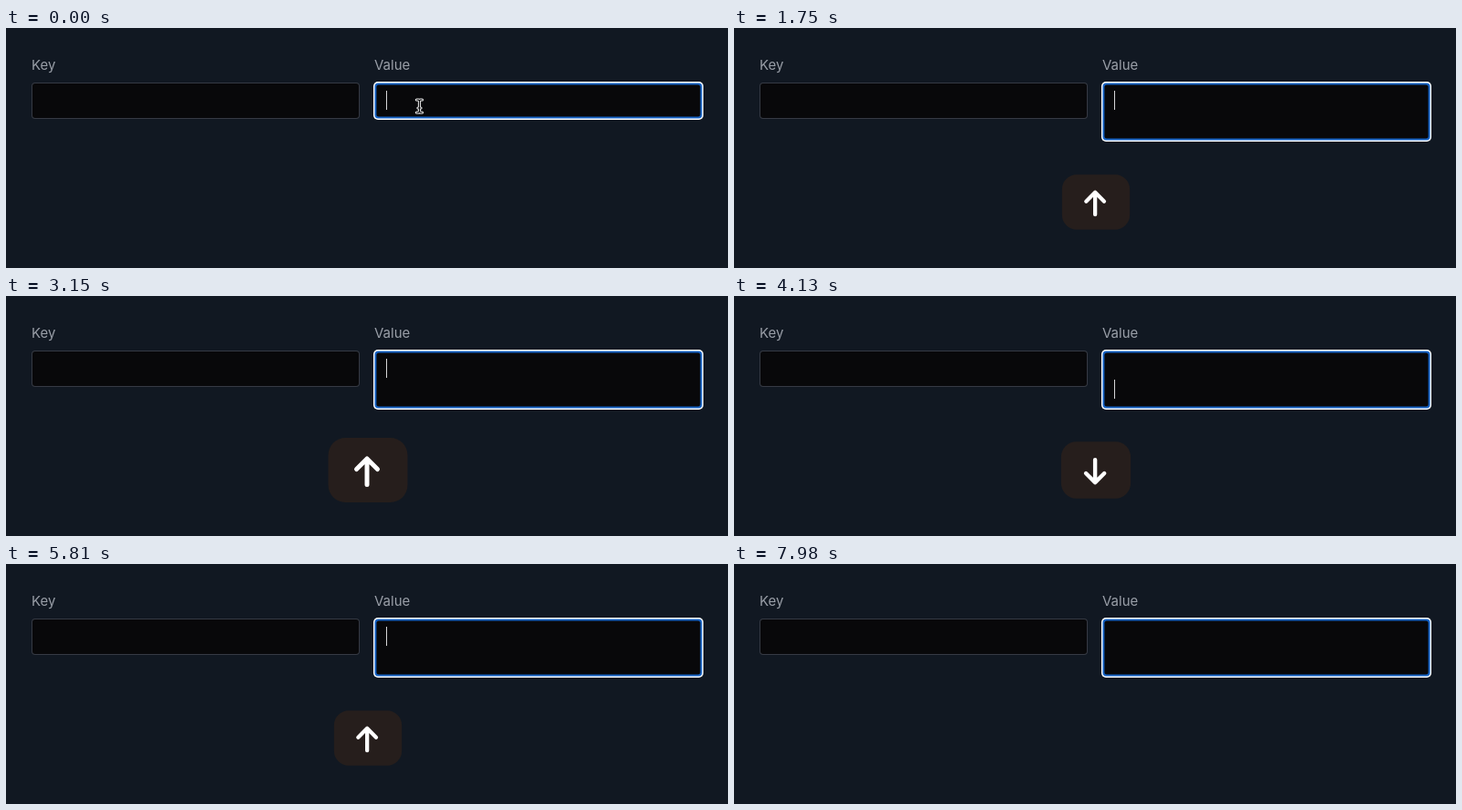
An HTML page with a canvas for the animation above (8120 ms loop, 792 by 264 pixels).

```html
<!DOCTYPE html>
<html lang="en">
<head>
<meta charset="utf-8">
<title>Key and value fields</title>
<style>
  html, body { margin: 0; width: 100%; height: 100%; overflow: hidden; background: #111822; }
  canvas { display: block; width: 792px; height: 264px; }
</style>
</head>
<body>
<canvas id="stage" width="792" height="264"></canvas>
<script>
const ctx = document.getElementById('stage').getContext('2d');
const LOOP = 8120, STEP = 70, BLINK = 500;
const POP = 280, FADE_AT = 840, FADE_END = 1180;
const LEAVE = 7070, LEAVE_TIME = 560;

const presses = [
  [980, 'enter'], [1750, 'up'], [2240, 'down'], [2660, 'up'],
  [4060, 'down'], [4690, 'up'], [5250, 'down'], [5810, 'up'], [6430, 'down']
].map(([at, key]) => ({ at, key }));

const clamp = v => Math.max(0, Math.min(1, v));
const smooth = p => p * p * (3 - 2 * p);

function box(x, y, w, h, r, color) {
  ctx.fillStyle = color;
  ctx.beginPath();
  ctx.roundRect(x, y, w, h, r);
  ctx.fill();
}

function lines(color, width, ...paths) {
  ctx.strokeStyle = color;
  ctx.lineWidth = width;
  ctx.beginPath();
  for (const path of paths) path.forEach(([x, y], i) => i ? ctx.lineTo(x, y) : ctx.moveTo(x, y));
  ctx.stroke();
}

function drawFields(tall) {
  const h = tall ? 66 : 42;
  ctx.font = '15px Inter, Roboto, sans-serif';
  ctx.fillStyle = '#9a9fa8';
  ctx.fillText('Key', 28, 46);
  ctx.fillText('Value', 404, 46);
  box(28, 60, 360, 40, 4, '#363a44');
  box(29, 61, 358, 38, 3, '#08080a');
  box(403, 59, 362, h, 5, '#ffffff');
  box(404.4, 60.4, 359.2, h - 2.8, 4, '#1662c4');
  box(406.4, 62.4, 355.2, h - 6.8, 2.5, '#08080a');
}

function drawCaret(t, press) {
  const since = press ? t - press.at : t + 90;
  if (Math.floor(since / BLINK) % 2) return;
  const low = press && press.key !== 'up';
  ctx.fillStyle = '#d6d6d8';
  ctx.fillRect(417, low ? 92 : 69, 1, 21);
}

function drawIcon(key) {
  if (key === 'enter') {
    lines('#fff', 5, [[13, -11], [13, 4], [-13, 4]], [[-5, -4], [-13, 4], [-5, 12]]);
    return;
  }
  if (key === 'down') ctx.scale(1, -1);
  lines('#fff', 5, [[0, -14], [0, 14.5]], [[-11.5, -2.5], [0, -14], [11.5, -2.5]]);
}

function drawKey(t, press, previous) {
  const age = t - press.at;
  if (age >= FADE_END) return;
  const fresh = !previous || press.at - previous.at > FADE_END;
  const fadeIn = fresh ? clamp(0.5 + age / 140) : 1;
  const scale = 0.855 + 0.145 * smooth(clamp(age / POP));
  ctx.save();
  ctx.globalAlpha = fadeIn * (1 - clamp((age - FADE_AT) / (FADE_END - FADE_AT)));
  ctx.translate(397, 191.5);
  ctx.scale(scale, scale);
  box(-43.5, -35.5, 87, 71, 19, '#261e1c');
  ctx.translate(-1, 1.5);
  drawIcon(press.key);
  ctx.restore();
}

function drawPointer(x, y) {
  const beam = [
    [[-3, -7], [-1, -7], [0, -6], [1, -7], [3, -7]],
    [[0, -6], [0, 6]],
    [[-3, 7], [-1, 7], [0, 6], [1, 7], [3, 7]],
    [[-1.5, 2], [1.5, 2]]
  ];
  ctx.save();
  ctx.translate(x, y);
  lines('#f2f2f2', 3.2, ...beam);
  lines('#08080a', 1.2, ...beam);
  ctx.restore();
}

function draw(t) {
  const index = presses.findLastIndex(p => p.at <= t);
  const press = presses[index];
  ctx.fillStyle = '#111822';
  ctx.fillRect(0, 0, 792, 264);
  drawFields(!!press);
  drawCaret(t, press);
  if (press) drawKey(t, press, presses[index - 1]);

  if (!press) drawPointer(453.5, 86);
  const p = (t - LEAVE) / LEAVE_TIME;
  if (p >= 0 && p <= 1) drawPointer(453.5 + 280 * p, 86 + 192 * p ** 3);
}

ctx.lineCap = ctx.lineJoin = 'round';
const start = performance.now();
function tick() {
  const t = (performance.now() - start) % LOOP;
  draw(Math.floor(t / STEP) * STEP);
  requestAnimationFrame(tick);
}
tick();
</script>
</body>
</html>
```
